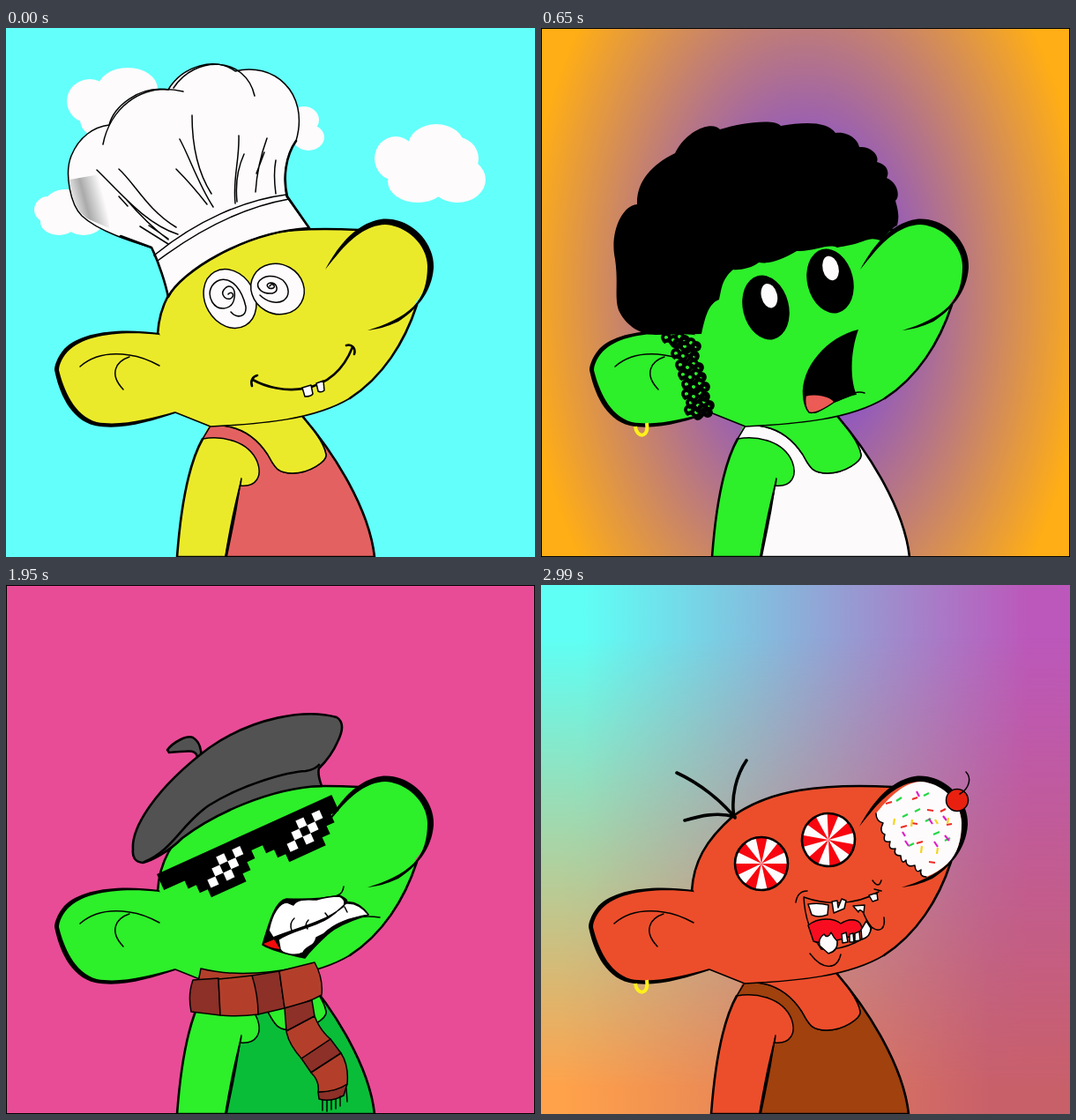
An HTML page without scripts that plays this animation: 600x600 px, repeating every 3250 ms.

```html
<!DOCTYPE html>
<html lang="en">
<head>
<meta charset="utf-8">
<title>Characters</title>
<style>
html, body { margin: 0; width: 100%; height: 100%; overflow: hidden; }
svg { display: block; width: 100vw; height: 100vh; }
.scene { visibility: hidden; animation: show 3250ms step-end infinite; }
.scene:nth-of-type(2) { animation-delay: 650ms; }
.scene:nth-of-type(3) { animation-delay: 1300ms; }
.scene:nth-of-type(4) { animation-delay: 1950ms; }
.scene:nth-of-type(5) { animation-delay: 2600ms; }
@keyframes show { 0% { visibility: visible; } 20% { visibility: hidden; } }

.chef { --skin: #ebea2a; --shirt: #e46161; }
.afro { --skin: #2def2a; --shirt: #fcfafb; }
.space { --skin: #2aeda9; --shirt: #e46161; }
.beret { --skin: #2def2a; --shirt: #0abd38; }
.candy { --skin: #ec4e2b; --shirt: #a0410e; }
.skin { fill: var(--skin); }
.shirt { fill: var(--shirt); }
.ink { stroke: #000; stroke-width: 1.5; stroke-linejoin: round; stroke-linecap: round; }
.line { fill: none; }
.bold { stroke-width: 2.6; }
.white { fill: #fdfbfc; }
.grey { fill: #a5a1a1; }
.blue { fill: #5147f5; }
.red { fill: #d10000; }
.rust { fill: #b33f2b; }
.brown { fill: #8c3028; }
.dots { fill: none; stroke: #fff; stroke-linecap: round; }
</style>
</head>
<body>
<svg viewBox="0 0 600 600">
<defs>
  <radialGradient id="sunset" gradientUnits="userSpaceOnUse" cx="0" cy="0" r="1" gradientTransform="translate(300 300) scale(320 510)">
    <stop offset=".24" stop-color="#8650d0"/><stop offset="1" stop-color="#ffae15"/>
  </radialGradient>
  <linearGradient id="sky">
    <stop offset=".08" stop-color="#5ffff5"/><stop offset=".92" stop-color="#bc58bb"/>
  </linearGradient>
  <linearGradient id="ground">
    <stop offset=".04" stop-color="#ffa24a"/><stop offset=".85" stop-color="#c8606a"/>
  </linearGradient>
  <linearGradient id="rise" x2="0" y2="1">
    <stop offset=".1" stop-color="#000"/><stop offset=".95" stop-color="#fff"/>
  </linearGradient>
  <mask id="fade"><rect width="600" height="600" fill="url(#rise)"/></mask>
  <linearGradient id="fold" gradientUnits="userSpaceOnUse" x1="72" y1="190" x2="110" y2="180">
    <stop stop-color="#eee"/><stop offset=".4" stop-color="#aaa"/><stop offset=".95" stop-color="#fdfbfc"/>
  </linearGradient>
  <linearGradient id="hose" gradientUnits="userSpaceOnUse" x1="158" y1="390" x2="180" y2="420">
    <stop stop-color="#86a878"/><stop offset="1" stop-color="#078a1c"/>
  </linearGradient>

  <g id="figure">
    <path class="skin" d="M194 600C197 560 204 500 223 466L232 445L336 440C372 482 412 545 418 600Z"/>
    <path class="shirt ink" d="M223 466L232 451C258 449 280 458 297 484C304 497 307 505 325 505C345 505 364 491 363 484C361 470 346 452 336 440C372 482 412 545 418 600H249C254 570 262 540 267 511L266 519C284 521 291 508 285 492C275 468 245 462 223 466Z"/>
    <path class="skin" d="M232 451C258 449 280 458 297 484C304 497 307 505 325 505C345 505 364 491 363 484C361 470 346 452 336 440L240 440Z"/>
    <path class="line ink" d="M232 451C258 449 280 458 297 484C304 497 307 505 325 505C345 505 364 491 363 484C361 470 346 452 336 440M194 599.5H418"/>
    <path class="line ink bold" d="M194 600C197 560 204 500 223 466M336 440C372 482 412 545 418 600"/>
    <path d="M267 509C259 540 253 568 248 600H251C257 570 264 540 267 509Z"/>
    <path class="skin" d="M172 347C174 315 187 290 219 262C260 232 320 225 400 229L466 314C452 357 427 396 390 420C350 444 292 449 232 452L192 436Z"/>
    <path class="line ink" d="M192 436L232 452C292 449 350 444 390 420"/>
    <path class="line ink bold" d="M172 347C174 315 187 290 219 262C260 232 320 225 400 229M466 314C452 357 427 396 390 420"/>
    <path d="M174 346C130 340 85 344 66 364C57 375 55 384 55 388C60 412 72 444 101 451C130 457 164 446 192 437L174 346Z"/>
    <path class="skin" d="M174 348C130 343 88 348 70 367C62 376 60 384 60 388C65 409 77 440 103 447C130 452 164 443 192 435L210 390Z"/>
    <path class="line ink" d="M84 384C100 370 120 368 140 371C155 373 165 378 174 383M140 373C125 378 116 392 133 410"/>
    <path class="skin" d="M362 274C380 250 400 224 428 219C455 216 482 240 481 272C480 300 462 324 410 343Z"/>
    <path d="M362 274C375 250 395 222 425 217C455 213 486 240 485 272C483 300 465 320 445 333C432 339 420 342 410 343C430 337 450 328 462 316C474 304 478 288 478 270C477 243 452 224 430 223C402 224 381 250 362 274Z"/>
  </g>
  <g id="smile">
    <path class="line ink bold" d="M280 399C310 416 370 420 393 362M279 406C277 400 280 395 285 394M386 360C392 358 397 363 395 370"/>
    <path class="white ink" d="M336 408L346 405L348 415Q346 418 339 418ZM352 403L360 400L361 411Q358 414 354 412Z"/>
  </g>
  <path id="earring" d="M107 452C108 465 123 466 120 448" fill="none" stroke="#fff01a" stroke-width="4"/>
  <rect id="frame" x=".5" y=".5" width="599" height="599" fill="none" stroke="#000"/>
  <g id="curls" fill="none" stroke="#000" stroke-width="3.8">
    <circle r="4"/><circle cx="8" cy="3" r="4"/><circle cx="15" cy="-1" r="4"/><circle cx="21" cy="3" r="4"/>
    <path d="M-3 6q5-6 9 1t10-2t8 2"/>
  </g>
  <path id="faint" class="dots" stroke-width="1.8" d="M20 40h0M96 18h0M210 60h0M190 85h0M305 66h0M420 21h0M440 120h0M590 60h0M515 180h0M575 205h0M12 190h0M60 180h0M20 300h0M45 330h0M520 290h0M585 340h0M510 400h0M590 420h0M440 480h0M535 530h0M60 500h0M150 495h0M170 550h0M40 590h0M180 465h0"/>
  <g id="can" class="ink">
    <path fill="#64939b" d="M-38 1C-36-19 34-16 35 3L33 19Q36 24 37 32L37 123C36 142-27 146-31 132L-36 30Q-33 22-36 15Z"/>
    <ellipse cx="-1" cy="1" rx="32" ry="10" fill="#55787f" transform="rotate(3)"/>
    <path class="line" d="M-36 14C-22 25 20 25 33 18M-35 29C-20 36-5 35 4 33M12 29Q25 28 30 24"/>
    <ellipse class="red" cx="11" cy="80" rx="25" ry="46"/>
    <path class="grey" d="M-50 61C-32 80 22 86 45 67Q51 77 41 96C18 114-42 111-59 91Q-60 74-50 61Z"/>
  </g>
  <g id="mint">
    <circle r="30" class="white"/>
    <circle r="15" fill="none" stroke="#f8060f" stroke-width="30" pathLength="14" stroke-dasharray="1"/>
    <circle r="30" class="line ink bold"/>
  </g>
  <path id="checks" fill="#fff" d="M7 1h1v1h-1zM9 1h1v1h-1zM6 2h1v1h-1zM8 2h1v1h-1zM5 3h1v1h-1zM7 3h1v1h-1z"/>
  <path id="hash" d="M-7-23V23M7-23V23M-19-7H19M-19 8H19"/>
</defs>

<g class="scene chef">
  <rect width="600" height="600" fill="#63fffb"/>
  <g class="white">
    <ellipse cx="95" cy="83" rx="26" ry="25"/><ellipse cx="138" cy="69" rx="34" ry="24"/><ellipse cx="112" cy="104" rx="28" ry="22"/>
    <ellipse cx="48" cy="206" rx="16" ry="15"/><ellipse cx="68" cy="201" rx="25" ry="18"/><ellipse cx="60" cy="220" rx="21" ry="15"/><ellipse cx="88" cy="220" rx="22" ry="15"/>
    <ellipse cx="338" cy="104" rx="17" ry="15"/><ellipse cx="343" cy="124" rx="18" ry="15"/>
    <ellipse cx="442" cy="148" rx="24" ry="25"/><ellipse cx="488" cy="134" rx="32" ry="25"/><ellipse cx="509" cy="148" rx="27" ry="25"/><ellipse cx="467" cy="174" rx="34" ry="24"/><ellipse cx="512" cy="172" rx="32" ry="26"/>
  </g>
  <use href="#figure"/>
  <path class="white ink" d="M184 305C181 290 173 265 165 249C145 243 105 231 86 213C73 200 66 165 74 145C83 123 100 112 117 110C122 90 150 65 184 70C200 43 238 32 260 49C302 38 345 72 329 128C317 145 314 170 318 191L344 227C270 231 198 277 184 305Z"/>
  <path fill="url(#fold)" d="M72 172C75 198 81 209 94 217L117 227L112 165Z"/>
  <path class="line ink" d="M110 132C117 95 150 60 201 72M190 68C215 30 272 32 282 77M168 258C215 219 270 195 318 189M172 264C220 228 270 203 321 194"/>
  <path class="line ink bold" d="M184 305C181 290 173 265 165 249L130 236M184 305C198 277 270 231 344 227L319 191C314 170 317 145 329 128"/>
  <path class="line ink" d="M103 161C130 187 158 222 195 234M128 160C146 176 160 206 193 226M137 195Q160 222 184 240M152 225L184 245M162 224L184 239M193 160Q211 178 228 200M197 126C208 146 218 177 235 203M211 99C211 130 217 163 233 188M264 122C265 150 257 170 260 199M270 143Q259 167 262 197M296 125Q285 155 283 186M306 150Q303 166 306 188M293 141L284 165M128 191L138 202"/>
  <g class="ink">
    <ellipse class="white" cx="254" cy="307" rx="28" ry="35" transform="rotate(-30 254 307)"/>
    <ellipse class="white" cx="308" cy="296" rx="31" ry="28" transform="rotate(30 308 296)"/>
    <path class="line" d="M252 302c3-4 8 0 4 4c-6 4-13-3-9-9c6-8 14-3 12 9c-2 14-18 16-25 5c-7-12 0-22 8-25c15-4 26 12 30 30c1 12-10 14-17 6M299 293c2-5 8 0 4 2c-6 2-10-5-3-6c8 0 10 10 2 12c-12 1-18-6-16-12c5-9 18-10 28-3c8 8 8 18 1 23c-8 5-20 1-27-6"/>
  </g>
  <use href="#smile"/>
</g>

<g class="scene afro">
  <rect width="600" height="600" fill="url(#sunset)"/>
  <use href="#figure"/>
  <path d="M88 320C83 305 88 290 84 262C78 235 90 202 109 200C108 175 125 155 152 142C165 115 195 105 203 115C225 108 265 102 272 111C300 106 325 106 334 119C350 117 360 128 361 135C375 134 384 145 381 152C394 155 395 165 392 170C404 175 408 190 402 196C406 210 406 215 404 224C398 226 392 235 385 241C378 239 375 238 365 242C355 246 345 247 336 249C325 244 310 254 290 253C275 262 260 268 247 266C240 272 225 275 218 274C205 285 205 295 202 308C188 313 185 335 182 347L130 348C110 348 95 335 88 320Z"/>
  <use href="#curls" x="142" y="351"/><use href="#curls" x="155" y="358"/><use href="#curls" x="153" y="369"/>
  <use href="#curls" x="158" y="382"/><use href="#curls" x="161" y="393"/><use href="#curls" x="165" y="404"/>
  <use href="#curls" x="165" y="415"/><use href="#curls" x="170" y="425"/><use href="#curls" x="168" y="433"/>
  <use href="#earring"/>
  <g transform="rotate(-14 255 317)"><ellipse cx="255" cy="317" rx="26" ry="37"/><ellipse class="white" cx="262" cy="305" rx="9" ry="14"/></g>
  <g transform="rotate(-14 328 287)"><ellipse cx="328" cy="287" rx="26" ry="37"/><ellipse class="white" cx="332" cy="273" rx="9" ry="14"/></g>
  <path d="M360 342C325 350 294 385 297 418C298 431 303 438 311 437C330 432 343 418 358 416C351 400 350 370 360 342Z"/>
  <path class="skin" d="M358 416L333 424L311 438Q340 430 358 416Z"/>
  <path fill="#ec5b55" class="ink" d="M300 417C312 414 328 417 333 424C323 431 310 438 304 436C300 432 299 425 300 417Z"/>
  <path class="line ink" d="M333 424C345 420 355 410 367 414"/>
  <use href="#frame"/>
</g>

<g class="scene space">
  <rect width="600" height="600" fill="#141c22"/>
  <path class="dots" stroke-width="5.2" d="M33 14h0M56 50h0M148 1h0M161 2h0M265 28h0M249 39h0M351 19h0M459 50h0M529 48h0M502 65h0M503 77h0M121 73h0M121 82h0M63 106h0M74 120h0M34 132h0M86 158h0M463 91h0M527 109h0M574 113h0M467 144h0M547 217h0M32 234h0M81 228h0M533 254h0M482 299h0M500 323h0M540 377h0M557 394h0M460 441h0M475 442h0M500 451h0M562 451h0M568 496h0M426 551h0M456 548h0M565 546h0M94 520h0M79 585h0M135 579h0M4 565h0"/>
  <path class="dots" stroke-width="3.4" d="M49 106h0M356 44h0M484 145h0M564 11h0M75 255h0M582 274h0M554 503h0M102 548h0M3 577h0M68 547h0M30 486h0M15 374h0M29 458h0M122 473h0M497 512h0M480 580h0M537 576h0"/>
  <use href="#faint"/><use href="#faint" transform="rotate(180 300 300)"/><use href="#faint" transform="rotate(90 300 300)"/>
  <use href="#figure"/>
  <path fill="#f2efa0" d="M190 333L219 343L235 371L247 344L283 340L265 325L262 300H210L214 322ZM303 285L312 326L334 302L364 306L350 283L350 265Z"/>
  <path fill="#fdf127" d="M208 325L233 333L238 346L246 332L263 327L260 305H212ZM317 285L322 303L333 291L348 293L342 270Z"/>
  <use href="#smile"/>
  <use href="#can" transform="translate(307 103) rotate(-32) scale(.91)"/>
  <g class="ink">
    <path class="blue" d="M152 137C110 150 85 190 88 215C90 240 105 258 130 272L172 318L200 160Z"/>
    <path class="blue" d="M170 317C220 265 270 225 330 203C360 195 395 192 413 195C424 203 415 215 400 230C360 268 300 298 240 317C210 325 190 328 176 327Z"/>
    <path class="line" d="M170 317C235 325 375 270 412 196"/>
    <path class="white" d="M111 213C107 180 160 105 235 95C250 92 260 100 268 108C290 135 315 170 330 203C270 225 220 265 170 317L130 272C118 260 110 235 111 213Z"/>
    <path class="blue" d="M152 138C155 123 170 120 176 127C172 138 160 143 152 138Z"/>
    <path class="red" d="M190 179L212 155L217 160L245 211L259 204L265 215L232 238L226 227L234 219L211 183L197 191Z"/>
  </g>
  <g transform="translate(169 208) rotate(-32)">
    <use href="#hash" stroke="#000" stroke-width="8.4"/>
    <use href="#hash" stroke="#d10000" stroke-width="5.8"/>
  </g>
  <use href="#can" transform="translate(87 270) rotate(-32)"/>
  <g class="ink grey">
    <path d="M358 425L372 420L417 378C432 371 446 388 440 399L382 452C376 458 368 456 363 451L350 434Q350 427 358 425Z"/>
    <path class="line" d="M358 425C372 425 386 440 380 454"/>
    <path d="M373 390C369 379 394 370 399 380C404 392 396 407 384 409C376 409 371 405 376 401Z"/>
    <ellipse cx="384" cy="385" rx="9" ry="5" transform="rotate(-25 384 385)" fill="#77787a"/>
  </g>
  <g fill="none">
    <path d="M160 389C187 422 205 471 240 483C283 498 325 462 368 438" stroke="#000" stroke-width="18"/>
    <path d="M159 388C187 422 205 471 240 483C283 498 325 462 368 438" stroke="url(#hose)" stroke-width="15.5"/>
  </g>
  <path d="M373 425L395 411M420 379L424 377" stroke="#a9e6ff" stroke-width="2.5"/>
</g>

<g class="scene beret">
  <rect width="600" height="600" fill="#e84c96"/>
  <use href="#figure"/>
  <g class="ink bold" fill="#525252">
    <path d="M183 187C190 178 205 170 212 173C220 178 222 188 221 194L217 195C215 185 205 189 185 190Z"/>
    <path d="M144 300C142 275 170 230 230 185C280 150 340 140 375 150C385 156 381 168 376 178C370 192 360 203 355 208C353 215 356 222 358 228C300 230 235 260 200 287C185 302 165 313 155 315C146 314 143 308 144 300Z"/>
    <path class="line" d="M157 314C190 300 199 271 230 250C270 225 320 212 340 211Q351 209 355 204"/>
  </g>
  <g transform="translate(171 328) rotate(-24.4) scale(9.9)">
    <path d="M0 0H22V2H21V3H20V4H19V5H14.4V4H13.4V3H12.4V2H11V3H10V4H9V5H4.6V4H3.6V3H2.6V2H0Z"/>
    <use href="#checks"/><use href="#checks" x="10"/>
  </g>
  <path class="ink" d="M291 408C298 385 305 358 318 356C345 357 365 355 378 352C386 356 388 358 386 360C395 358 405 365 411 374C400 378 380 383 366 395C355 405 345 415 339 423C325 420 303 415 291 408Z"/>
  <path fill="#f40b0b" d="M292 407L304 402L311 413Q300 412 292 407Z"/>
  <path class="ink" fill="#fff" d="M298 392C302 372 310 360 319 360L326 363C330 355 345 357 352 357C362 354 374 353 378 353C387 357 384 364 381 366C360 383 330 389 303 400ZM309 402C325 392 340 390 355 383C370 378 380 365 386 361C397 360 406 367 411 374C390 378 373 383 360 396L352 400C350 411 340 409 337 417C328 422 313 418 311 413Z"/>
  <path class="line ink" d="M324 392Q321 383 327 378M342 390Q338 385 343 380M365 376L362 372M387 371L384 365M376 352Q382 350 383 342M366 395C385 377 403 374 424 377"/>
  <g class="ink">
    <path class="rust" d="M221 435C260 445 310 440 345 430L330 450L218 450Z"/>
    <path class="brown" d="M212 448L241 446L243 488L210 484Q206 465 212 448ZM279 443L310 438L316 480L286 487Z"/>
    <path class="rust" d="M241 447L279 443Q286 465 286 487Q265 490 243 488ZM310 438L350 428Q360 446 358 465Q340 475 316 480Z"/>
    <path class="brown" d="M316 480L347 471L350 489L318 506ZM335 537L368 515L380 531L346 553ZM354 575Q374 575 387 566L383 579Q368 587 355 583Z"/>
    <path class="rust" d="M318 506L350 489Q356 505 368 515L335 537Q320 520 318 506ZM346 553L380 531Q389 545 387 566Q374 575 354 575Q356 563 346 553Z"/>
    <path class="line" d="M359 584V596M364 585V597M369 584V595M374 583V594M379 580V591M386 571L387 586"/>
  </g>
  <use href="#frame"/>
</g>

<g class="scene candy">
  <rect width="600" height="600" fill="url(#sky)"/>
  <rect width="600" height="600" fill="url(#ground)" mask="url(#fade)"/>
  <use href="#figure" x="-1"/>
  <use href="#earring"/>
  <path class="line ink" style="stroke-width:3.6" d="M220 264C205 245 180 225 154 213M219 263C215 240 222 215 233 199M220 263C200 257 180 262 163 267"/>
  <use href="#mint" transform="translate(250 316)"/>
  <use href="#mint" transform="translate(326 289) rotate(10)"/>
  <path class="white" d="M380 259C395 241 410 225 430 223C453 224 476 243 477 270C477 290 472 305 461 316Q450 326 437 331Q429 331 431 323Q425 328 424 318Q414 321 414 312Q409 318 408 307Q399 307 402 299Q393 301 396 291Q387 293 390 283Q383 280 388 270Q380 268 380 259"/>
  <path class="line ink" d="M437 331Q429 331 431 323Q425 328 424 318Q414 321 414 312Q409 318 408 307Q399 307 402 299Q393 301 396 291Q387 293 390 283Q383 280 388 270Q380 268 380 259"/>
  <g fill="none" stroke-width="2.2">
    <path stroke="#ef2b25" d="M391 248l7-2M408 275l7-2M420 270l7 1M438 255l7 1M453 257l6-3M426 293l7-2M460 272l6-1M440 314l7 1M421 243l6-2"/>
    <path stroke="#24d845" d="M403 245l6-4M434 239l6-3M410 263l6-3M424 257l6-3M445 283l7-3M417 296l6-3M436 268l6-3M458 290l6-3"/>
    <path stroke="#dd20c8" d="M426 234l3 6M440 265l4 6M413 290l4 6M446 291l4 6M456 262l4 5M410 280l3 5M458 284l5 6"/>
    <path stroke="#f3d51d" d="M401 265l-1 7M421 266l-1 8M432 296l-1 8M450 298l-1 7M462 264l-1 7M447 266l3 5"/>
  </g>
  <circle class="ink" cx="472" cy="244" r="12.5" fill="#e9200f"/>
  <path class="line ink" d="M475 237C487 230 488 218 482 212"/>
  <g class="ink">
    <path class="line" d="M289 360Q291 347 302 347M298 354C320 362 355 365 383 348M376 335Q383 345 386 335M378 345L386 347M298 354C299 375 305 395 318 413C345 415 374 400 375 388Q368 380 364 367M375 388C384 395 391 390 389 377M305 418C320 438 336 436 340 419"/>
    <path fill="#f80d20" d="M303 386C315 376 333 378 340 384C350 377 364 378 364 391C352 402 317 408 309 404Z"/>
    <path class="white" d="M303 362Q315 360 326 363L325 374Q314 378 307 374ZM330 359L336 358L337 366L341 356L346 358L344 367L332 372ZM354 364L367 363L366 372Q361 366 360 371ZM372 352L381 349L382 357L376 359ZM316 409Q314 401 321 396Q325 402 329 394Q332 400 336 404Q337 415 326 418ZM341 396L346 394L348 405L342 406ZM350 396L354 395L355 405L350 405ZM356 395L361 393L362 403L356 404ZM363 391L369 381L374 389Q374 399 364 402Z"/>
  </g>
</g>
</svg>
</body>
</html>
```
